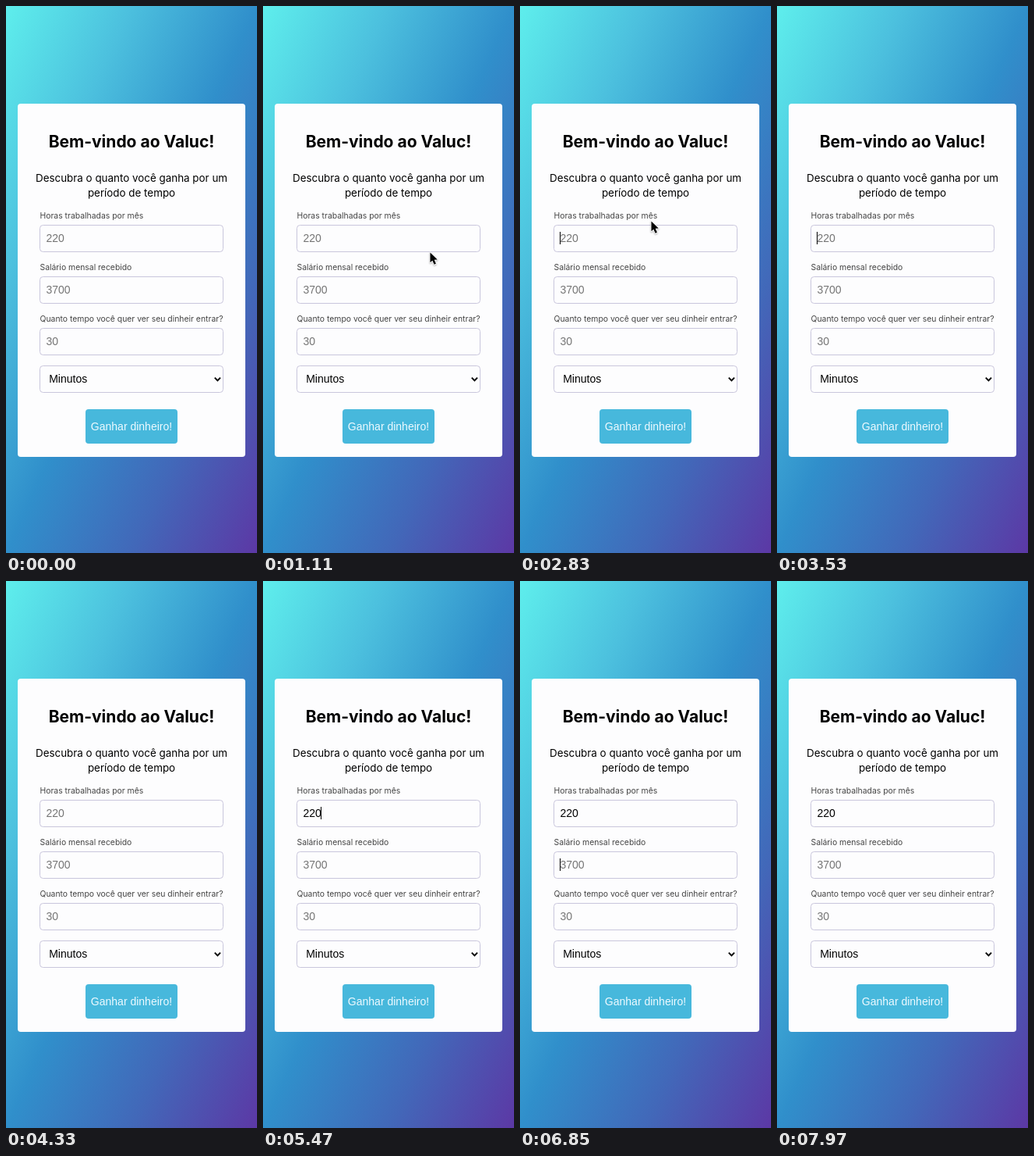
These frames come from a looping animation (322 by 700 pixels, 7.99 s). An HTML page with a canvas:

```html
<!DOCTYPE html>
<html lang="pt-BR">
<head>
<meta charset="utf-8">
<title>Ganhos por tempo</title>
<style>
html, body { margin: 0; width: 100%; height: 100%; overflow: hidden; }
canvas { display: block; width: 322px; height: 700px; }
</style>
</head>
<body>
<canvas id="stage"></canvas>
<script>
const W = 322, H = 700, LOOP = 7990;
const SANS = 'Inter, sans-serif';
const FORM = '14px "Liberation Sans", Arial, sans-serif';
const HINT = '#757575', BORDER = '#c9c6dc', FIELD_X = 51.5;

const canvas = document.getElementById('stage');
const ctx = canvas.getContext('2d');
const dpr = window.devicePixelRatio || 1;
canvas.width = W * dpr;
canvas.height = H * dpr;
ctx.scale(dpr, dpr);

// Pointer path: time, x, y
const path = [
  [640, 330, 440], [1110, 214, 315], [1700, 176, 300],
  [2400, 167, 291], [2830, 168, 275], [3250, 156, -22]
];
const keys = [4600, 4850, 5100];
const FOCUS = 2400, TAB = 6400;

function box(x, y, w, h, r, fill, stroke) {
  ctx.beginPath();
  ctx.roundRect(x, y, w, h, r);
  ctx.fillStyle = fill;
  ctx.fill();
  if (stroke) {
    ctx.strokeStyle = stroke;
    ctx.lineWidth = 1;
    ctx.stroke();
  }
}

function text(str, x, y, font, color, align = 'left') {
  ctx.font = font;
  ctx.fillStyle = color;
  ctx.textAlign = align;
  ctx.fillText(str, x, y);
}

function diagonal() {
  const k = 2 * W * H / (W * W + H * H);
  const g = ctx.createLinearGradient(0, 0, k * H, k * W);
  const colors = ['#5eeeec', '#4cc0de', '#308fcb', '#4268b9', '#5c38a5'];
  colors.forEach((color, i) => g.addColorStop(i / (colors.length - 1), color));
  return g;
}
const backdrop = diagonal();

function field(label, y, value, color) {
  text(label, 43.5, y - 8, '10.4px ' + SANS, '#444');
  box(43.5, y + 0.5, 235, 34, 4, '#fdfdfe', BORDER);
  text(value, FIELD_X, y + 22, FORM, color);
}

function caret(x, y) {
  ctx.fillStyle = '#000';
  ctx.fillRect(x, y, 1, 16);
}

function typedWidth(str) {
  ctx.font = FORM;
  return Math.round(ctx.measureText(str).width);
}

function form(t) {
  const typed = '220'.slice(0, keys.filter(k => t >= k).length);
  box(15, 125, 292, 452, 4, '#fdfdfe');
  text('Bem-vindo ao Valuc!', 161, 181, 'bold 21px ' + SANS, '#000', 'center');
  text('Descubra o quanto você ganha por um', 161, 225, '13.4px ' + SANS, '#000', 'center');
  text('período de tempo', 161, 244, '13.4px ' + SANS, '#000', 'center');

  field('Horas trabalhadas por mês', 280, typed || '220', typed ? '#000' : HINT);
  field('Salário mensal recebido', 346, '3700', HINT);
  field('Quanto tempo você quer ver seu dinheir entrar?', 412, '30', HINT);

  box(43.5, 460.5, 235, 34, 4, '#fdfdfe', BORDER);
  text('Minutos', 55.2, 482, FORM, '#000');
  ctx.beginPath();
  ctx.moveTo(267.8, 475.6);
  ctx.lineTo(271.4, 479.4);
  ctx.lineTo(275, 475.6);
  ctx.strokeStyle = '#000';
  ctx.lineWidth = 2;
  ctx.stroke();

  box(102, 516, 118, 44, 4, '#47b8dc');
  text('Ganhar dinheiro!', 161, 543, FORM, '#eefaff', 'center');

  // The blink restarts on every focus change or key press
  const last = [FOCUS, ...keys, TAB].filter(k => t >= k).pop();
  if (last !== undefined && (t - last) % 1000 < 500) {
    if (t >= TAB) caret(51, 355);
    else caret(51 + typedWidth(typed), 289);
  }
}

function pointer(t) {
  const i = path.findIndex(p => p[0] > t);
  if (i < 1) return;
  const [t0, x0, y0] = path[i - 1], [t1, x1, y1] = path[i];
  const p = (t - t0) / (t1 - t0);
  ctx.save();
  ctx.translate(x0 + (x1 - x0) * p, y0 + (y1 - y0) * p);
  ctx.scale(0.92, 0.92);
  ctx.beginPath();
  const shape = [[0.5, 0.5], [0.5, 14.5], [3.6, 11.6], [6.1, 17.2], [8.6, 16.1], [6.2, 10.7], [10.6, 10.4]];
  for (const [x, y] of shape) ctx.lineTo(x, y);
  ctx.closePath();
  ctx.lineJoin = 'round';
  ctx.lineWidth = 2;
  ctx.strokeStyle = '#fff';
  ctx.shadowColor = 'rgba(0,0,0,0.3)';
  ctx.shadowBlur = 2 * dpr;
  ctx.shadowOffsetY = dpr;
  ctx.stroke();
  ctx.shadowColor = 'transparent';
  ctx.fillStyle = '#000';
  ctx.fill();
  ctx.restore();
}

function draw(now) {
  const t = now % LOOP;
  ctx.fillStyle = backdrop;
  ctx.fillRect(0, 0, W, H);
  form(t);
  pointer(t);
}

let start;
function tick(now) {
  start ??= now;
  draw(now - start);
  requestAnimationFrame(tick);
}
draw(0);
requestAnimationFrame(tick);
</script>
</body>
</html>
```
